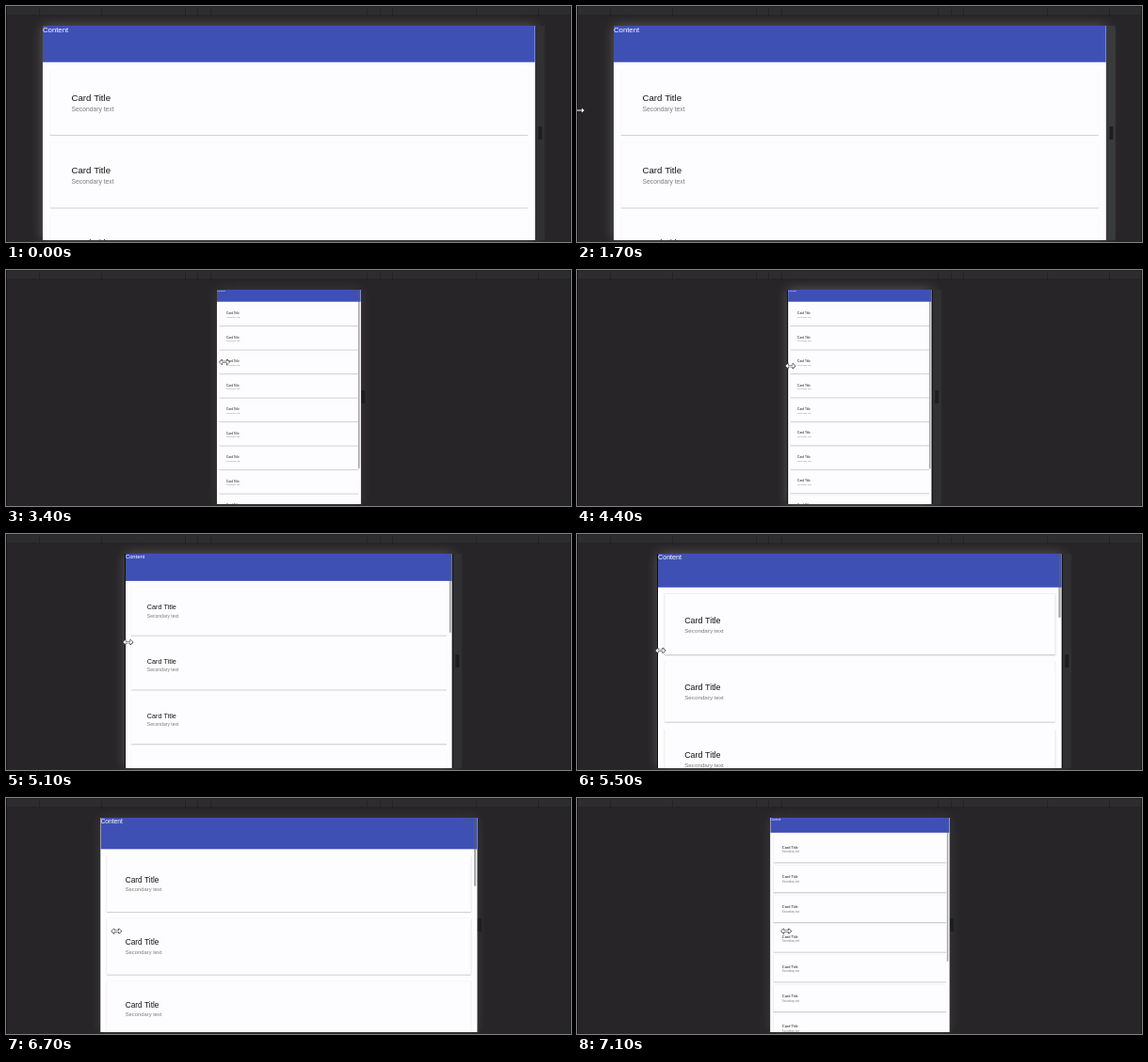
Write an HTML page with a canvas that moves like this. It is 600x251 px and loops after 7200 ms.

```html
<!DOCTYPE html>
<html lang="en">
<head>
<meta charset="utf-8">
<title>Responsive card list</title>
<style>
  html, body { margin: 0; width: 100%; height: 100%; overflow: hidden; background: #272527; }
  canvas { display: block; width: 600px; height: 251px; }
</style>
</head>
<body>
<canvas id="stage"></canvas>
<script>
const WIDTH = 600, HEIGHT = 251, LOOP = 7200, STEP = 100;
const CENTER = 300.4, TOP = 21, BOTTOM = 249;
const LAYOUT_WIDTH = 959, MAX_SCALE = 0.484, CONTENT_HEIGHT = 1716;
const DRAG_START = 2300, PAPER = '#fdfcfe';
const FONT = '"Liberation Sans", Arial, sans-serif';

const canvas = document.getElementById('stage');
const ctx = canvas.getContext('2d');
const ratio = window.devicePixelRatio || 1;
canvas.width = WIDTH * ratio;
canvas.height = HEIGHT * ratio;

const clamp = u => Math.min(1, Math.max(0, u));
const progress = (t, from, to) => clamp((t - from) / (to - from));

// Turning points of the drag: [time, left edge of the page]
const drag = [
  [DRAG_START, 39], [3100, 194], [3500, 234], [4500, 223],
  [5100, 127], [5500, 86], [6200, 36], [6500, 48], [LOOP, 231.5]
];

function leftEdge(t) {
  let [time, left] = drag[0];
  for (const [nextTime, nextLeft] of drag) {
    if (t <= nextTime) return left + (nextLeft - left) * (progress(t, time, nextTime) || 0);
    [time, left] = [nextTime, nextLeft];
  }
  return left;
}

// The page trails the pointer while it shrinks.
function resizePosition(t) {
  if (t < DRAG_START) return [2.5 + 39 * progress(t, 1800, 2200), 111];
  const x = Math.max(leftEdge(t), leftEdge(t + 55)) + 2.5;
  return [x, 119.5 - 22.5 * Math.cos((t - 3700) / 3200 * Math.PI)];
}

function pointerPosition(t) {
  const u = progress(t, 100, 1500);
  return [571 - 581 * u * (2 - u), 134 - 23 * u];
}

function rect(x, y, w, h, color) {
  ctx.fillStyle = color;
  ctx.fillRect(x, y, w, h);
}

function shadowRect(x, y, w, h, color, shadow, blur, offsetY = 0) {
  ctx.save();
  ctx.shadowColor = shadow;
  ctx.shadowBlur = blur * ratio;
  ctx.shadowOffsetY = offsetY * ratio;
  rect(x, y, w, h, color);
  ctx.restore();
}

function text(label, x, y, size, color) {
  ctx.font = `${size}px ${FONT}`;
  ctx.fillStyle = color;
  ctx.fillText(label, x, y);
}

function drawBackdrop() {
  rect(0, 0, WIDTH, HEIGHT, '#272527');
  rect(0, 0, WIDTH, 10, '#2d2c2e');
  rect(0, 0, WIDTH, 1, '#242325');
  rect(0, 9.5, WIDTH, 1, '#222123');
  for (const d of [83, 97, 110, 199, 265]) {
    rect(300 - d, 1, 1, 9, '#232224');
    rect(300 + d, 1, 1, 9, '#232224');
  }
  rect(0, 0, 1, HEIGHT, '#141414');
  rect(WIDTH - 1, 0, 1, HEIGHT, '#1b1b1b');
}

function drawCard(x, y, w, h, s) {
  shadowRect(x, y, w, h, PAPER, 'rgba(0,0,0,.2)', 1.6, 0.5);
  rect(x, y + h, w, 0.8, '#cbcacc');
  text('Card Title', x + 47 * s, y + 68.5 * s, 20 * s, '#151515');
  text('Secondary text', x + 47 * s, y + 91 * s, 14 * s, '#7c7b7d');
}

function drawPage(t) {
  const left = leftEdge(t), width = 2 * (CENTER - left), right = left + width;
  const height = BOTTOM - TOP;
  const s = Math.min(width / LAYOUT_WIDTH, MAX_SCALE);
  const change = leftEdge(t + 1) - leftEdge(t - 1);
  const shrinking = change > 0.05, growing = t > 4000 && change < 0;

  shadowRect(left, TOP, width, height, PAPER,
    `rgba(255,255,255,${shrinking ? 0.1 : 0.25})`, 12);
  if (!shrinking) rect(right, TOP, 10, height, t >= 100 && t < DRAG_START ? '#393a3c' : '#313133');
  rect(right + (shrinking ? 0.5 : 3.5), 128, 4, 14, '#1e1d1f');
  if (growing) rect(left - 1, TOP, width + 2, height, '#0c0c0c');

  ctx.save();
  ctx.beginPath();
  ctx.rect(left, TOP, width, height);
  ctx.clip();
  rect(left, TOP, width, height, PAPER);
  rect(left, TOP, width, 80 * s, '#3f50b5');
  text('Content', left, TOP + 14.5 * s, 16 * s, '#fff');
  for (let y = TOP + 96 * s; y < BOTTOM; y += 160 * s) {
    drawCard(left + 16 * s, y, width - 32 * s, 144 * s, s);
  }
  if (t > DRAG_START) {
    const bar = Math.max(1.5, 5 * s);
    rect(right - bar - 1.2, TOP, bar, height * height / s / CONTENT_HEIGHT,
      `rgba(95,95,100,${s < MAX_SCALE ? 0.55 : 0.2})`);
  }
  ctx.restore();
}

function drawCursor(points, [x, y]) {
  ctx.beginPath();
  for (const [dx, dy] of points) ctx.lineTo(x + dx, y + dy);
  ctx.closePath();
  ctx.lineWidth = 1.1;
  ctx.lineJoin = 'round';
  ctx.strokeStyle = '#222';
  ctx.stroke();
  ctx.fillStyle = '#fff';
  ctx.fill();
}

const pointer = [[0, 0], [0, 8], [2, 6], [6, 6]];
const arrowHead = [[-2.6, -0.6], [-2.6, -2.5], [-5.2, 0], [-2.6, 2.5], [-2.6, 0.6]];
const resize = [...arrowHead, ...arrowHead.map(([x, y]) => [-x, -y])];

function draw(t) {
  ctx.setTransform(ratio, 0, 0, ratio, 0, 0);
  drawBackdrop();
  drawPage(t);
  if (t >= 100 && t < 1500) drawCursor(pointer, pointerPosition(t));
  if (t >= 1700) drawCursor(resize, resizePosition(t));
}

const start = performance.now();
function tick() {
  const elapsed = (performance.now() - start) % LOOP;
  draw(Math.floor(elapsed / STEP) * STEP);
  requestAnimationFrame(tick);
}
tick();
</script>
</body>
</html>
```
